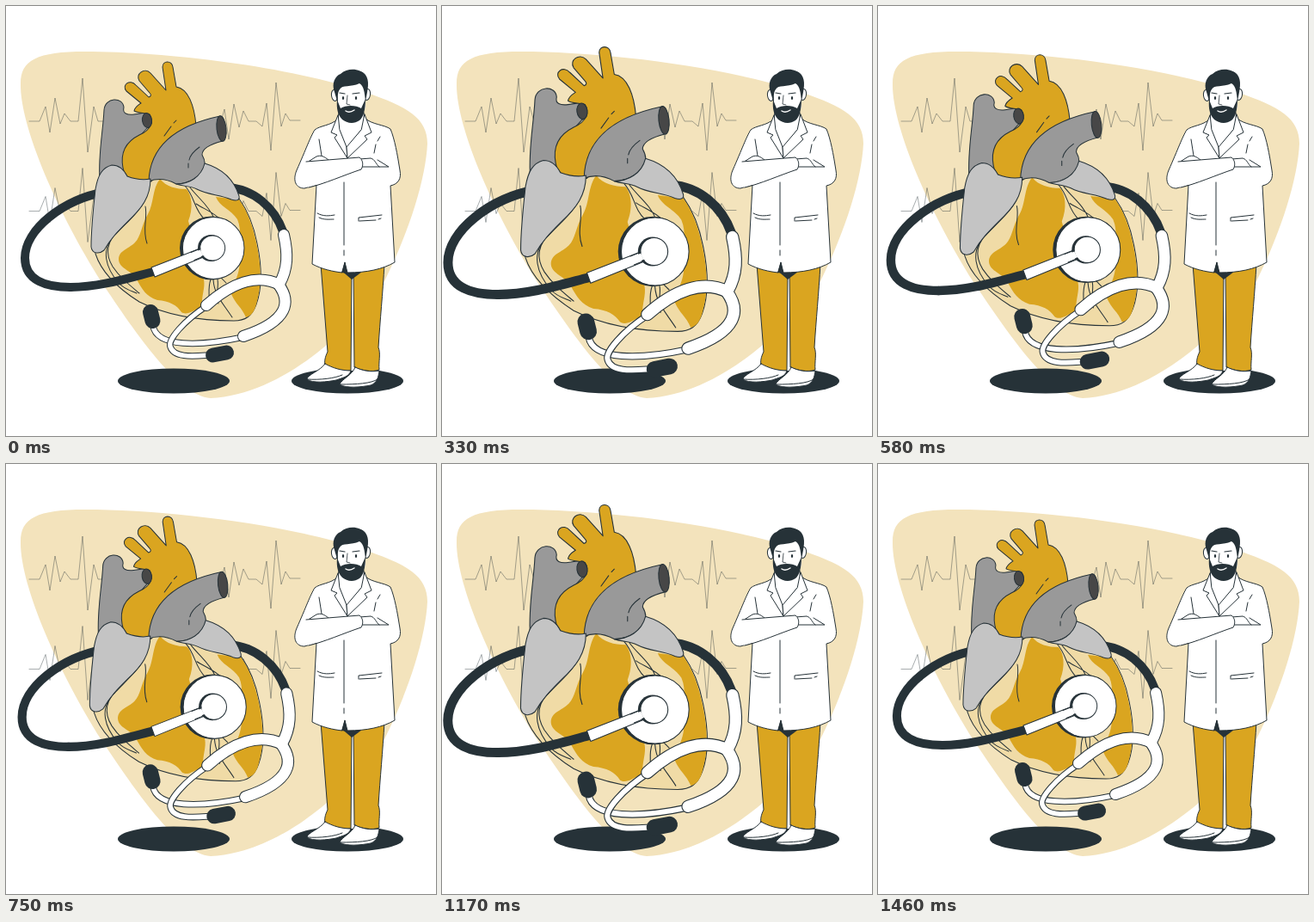
These frames come from a looping animation (500 px wide and 500 px high, 1500 ms). An HTML page:

```html
<!DOCTYPE html>
<html lang="en">
<head>
<meta charset="utf-8">
<title>Heart check</title>
<style>
  html, body { margin: 0; width: 100%; height: 100%; overflow: hidden; background: #fff; }
  svg { display: block; width: 100vw; height: 100vh; }
  path, ellipse { stroke-linecap: round; stroke-linejoin: round; }
</style>
</head>
<body>
<svg id="stage" viewBox="0 0 500 500"></svg>
<script>
const INK = '#263238', GOLD = '#daa520', PALE = '#f3e3bc', CREAM = '#f0dba6';
const GREY = '#999', LIGHT = '#c4c4c4', DARK = '#474747', WHITE = '#fff';
const stage = document.getElementById('stage');

function add(parent, tag, attrs) {
  const node = document.createElementNS('http://www.w3.org/2000/svg', tag);
  for (const key in attrs) node.setAttribute(key, attrs[key]);
  return parent.appendChild(node);
}
const fill = (g, d, color) => add(g, 'path', { d, fill: color });
const line = (g, d, width = 1, color = INK) =>
  add(g, 'path', { d, fill: 'none', stroke: color, 'stroke-width': width });
const shape = (g, d, color = WHITE) =>
  add(g, 'path', { d, fill: color, stroke: INK, 'stroke-width': 1 });
const oval = (g, cx, cy, rx, ry, color, turn = 0, stroke = 'none') =>
  add(g, 'ellipse', { cx, cy, rx, ry, fill: color, stroke, transform: `rotate(${turn} ${cx} ${cy})` });

// Several tubes share one outline so that their joints stay open.
function tubes(g, width, ...paths) {
  paths.forEach(d => line(g, d, width + 2));
  paths.forEach(d => line(g, d, width, WHITE));
}

function drawBackground(g) {
  fill(g, 'M17 90C17 63 36 53 92 53C185 53 330 70 420 101C466 117 490 130 490 160C488 200 470 260 440 320C402 376 322 452 238 456C200 453 152 382 111 321C60 240 16 140 17 90Z', PALE);
  const pulse = 'M27 134H39L46 117L51 147L57 107L63 137L68 125L75 134H84L89 84L95 170L102 117L107 134H120'
    + 'M250 134L254 120L259 155L265 114L271 141L276 122L282 134H291L298 140L303 113L308 168L314 89L320 140L325 125L330 133H342';
  for (const y of [0, 104.5])
    add(g, 'path', { d: pulse, fill: 'none', stroke: INK, 'stroke-width': 0.8, opacity: 0.5, transform: `translate(0 ${y})` });
  oval(g, 195, 436, 65, 14.5, INK);
  oval(g, 397, 436, 65, 14.5, INK);
}

function drawHeart(g) {
  // Tube behind the heart
  line(g, 'M116 216C66 225 22 260 22 293C22 320 48 327 75 327', 10);
  line(g, 'M258 211C288 213 312 234 322 262', 10);

  // Ventricles
  shape(g, 'M150 200C120 230 100 270 104 288C110 307 128 327 155 344C185 359 225 366 265 366C278 366 286 361 291 347C299 325 297 300 292 276C288 255 281 238 271 224C240 200 200 195 150 200Z', CREAM);
  fill(g, 'M179 201C170 212 172 230 165 242C157 256 157 268 150 275C142 283 131 284 131 295C132 306 146 307 152 318C158 329 163 338 176 342C190 343 199 348 204 356C210 360 217 355 228 349C227 337 232 328 230 318L212 250C218 235 216 220 210 213C198 213 186 210 179 201Z', GOLD);
  fill(g, 'M244 222C248 233 262 237 269 248C275 262 270 275 271 290C275 310 262 325 262 335C267 347 274 350 279 362C287 360 290 352 292 343C298 322 296 298 291 275C287 256 281 239 271 225Z', GOLD);
  line(g, 'M167 203C166 228 148 243 134 258C116 274 115 288 124 303C132 315 142 323 155 334M163 222C158 237 140 252 128 265C108 283 117 306 131 322C137 329 145 331 152 334');
  line(g, 'M162 233C165 246 158 260 164 276');
  line(g, 'M208 209C220 222 218 236 231 248M214 211C224 224 236 232 242 247M221 230C230 236 242 240 250 249');
  line(g, 'M238 318C233 332 240 342 232 350M241 318C242 336 252 345 263 362M246 318C248 330 242 338 247 346M249 315L256 322');

  // Vessels
  shape(g, 'M109 202C107 172 113 145 114 121C115 106 136 105 137 118C135 125 141 127 149 126L163 124C171 125 172 141 164 142L155 152L140 200Z', GREY);
  shape(g, 'M169 204C150 204 138 202 136 188C132 167 143 156 155 150C169 144 172 134 167 126C160 124 154 125 149 122C150 117 154 115 157 113L140 99C134 92 144 84 151 92L166 106C169 105 169 103 167 101L155 87C150 79 161 71 168 78L186 98L182 71C182 63 193 63 194 71L198 94C212 96 219 116 221 139Z', GOLD);
  oval(g, 164, 133, 5.5, 8.5, DARK, -8, INK);
  shape(g, 'M166 204C167 170 187 141 249 128L252 157C236 161 228 166 228 173C232 180 233 186 228 192C221 202 209 207 198 207C187 201 176 200 166 204Z', GREY);
  oval(g, 250.5, 142.5, 5.5, 14.8, DARK, -6, INK);
  line(g, 'M184 151L192 140M195 136L198 133M225 164C218 169 214 174 213 179M212 183V188');

  // Atria
  shape(g, 'M123 185C112 188 107 196 104 213C101 240 99 262 99 280C100 288 108 289 114 284C122 270 130 262 142 250C158 235 168 222 168 201C158 203 149 201 141 198C137 190 131 185 123 185Z', LIGHT);
  shape(g, 'M231 183C248 188 264 198 271 221C272 226 268 227 262 225C249 219 235 220 222 213C214 209 207 210 198 207C213 207 227 199 231 183Z', LIGHT);

  // Stethoscope
  line(g, 'M75 327C108 327 140 317 171 309', 10);
  oval(g, 239, 281.5, 37, 37, INK);
  oval(g, 241.2, 281.5, 35.8, 36, WHITE, 0, INK);
  shape(g, 'M169 304L228 281L232 291L173 315Z');
  oval(g, 238.5, 281.5, 15.5, 15.5, INK);
  oval(g, 240.2, 281.5, 14.5, 14.5, WHITE, 0, INK);
  fill(g, 'M216 287L226 283.5L229 290L219 295Z', WHITE);
  line(g, 'M215 286.5L226 282M219 295.5L230 291');

  tubes(g, 5.5, 'M171 372C175 397 225 396 276 385');
  tubes(g, 5.5, 'M233 349C207 366 188 388 191 396C195 410 220 407 236 406');
  tubes(g, 12, 'M323 266C328 288 328 305 318 323',
    'M233 348C262 322 292 311 318 324',
    'M317 324C331 343 330 366 276 384');
  line(g, 'M168 356L170.5 366', 18);
  line(g, 'M240.5 406L256.5 403', 17);
}

function drawDoctor(g) {
  // Legs and shoes
  fill(g, 'M395 306H410L406 424H400Z', WHITE);
  shape(g, 'M366 300L374 402C371 408 370 413 371 418C382 423 391 424 401 424L402 308Z', GOLD);
  shape(g, 'M404 308L405 420C414 424 426 426 434 423C433 414 436 404 433 397C435 365 438 335 440 300Z', GOLD);
  fill(g, 'M388 306L402 318L418 306Z', INK);
  shape(g, 'M371 416C366 424 350 429 350 434C356 439 374 437 384 435C392 432 399 431 401 424C390 424 380 421 371 416Z');
  shape(g, 'M406 420C403 429 390 434 388 440C395 445 414 443 424 441C432 438 433 431 434 424C424 426 414 424 406 420Z');
  line(g, 'M350 434C366 435 382 433 391 429M389 440C407 440 425 439 432 434');

  // Coat
  shape(g, 'M385 132C378 139 365 139 359 144C354 152 349 166 338 191C333 203 337 212 347 212L361 208L356 300C367 306 381 309 391 310L394 298L397 310C420 310 438 306 452 298L447 209C456 207 460 201 458 191C455 172 452 155 447 143C440 138 426 138 418 131Z');
  fill(g, 'M390 310L394 297L397 311Z', INK);
  shape(g, 'M387 124L385 139L396 166L417 139L416 124Z');
  shape(g, 'M386 127L378 147L385 150L382 153L397 177L396 164L388 144Z');
  shape(g, 'M417 126L425 147L417 151L420 155L397 177L396 164L413 144Z');
  line(g, 'M393 205V278M393 284V290');
  line(g, 'M362 241C369 245 376 244 382 243M364 246C370 249 376 248 381 248M410 250V246L437 243M411 250L430 249M433 248L436 247');
  line(g, 'M364 155L367 174M435 152L432 157M430 161L428 171');

  // Folded arms
  shape(g, 'M353 180L361 175C366 173 370 175 375 179L366 184Z');
  line(g, 'M411 178L424 177C429 178 430 184 434 187M432 179L445 187H414');
  fill(g, 'M349 181L411 176C415 179 416 185 413 190L352 211L342 205Z', WHITE);
  line(g, 'M349 181L411 176C415 179 416 185 413 190C392 197 370 207 352 211');

  // Head
  oval(g, 382, 104, 3.5, 6.5, WHITE, -8, INK);
  oval(g, 420, 103, 3.5, 6.5, WHITE, 8, INK);
  fill(g, 'M384 88H418V118C413 130 391 130 386 118Z', WHITE);
  fill(g, 'M382 100C378 90 383 81 389 79C398 71 412 73 418 80C423 87 421 96 418 111C417 100 416 93 411 90C401 95 391 91 388 97C385 101 386 106 386 114Z', INK);
  fill(g, 'M385 109L389 119C395 115 407 115 413 119L418 108C418 122 415 130 411 133C404 138 396 136 391 132C386 127 384 120 385 109Z', INK);
  line(g, 'M395 122C398 124 402 123 405 121', 1.4, WHITE);
  line(g, 'M388 101L394 102M403 102L411 101', 1.2);
  line(g, 'M397 104L396 114L400 115', 0.8);
  oval(g, 392, 107, 1.2, 2, INK);
  oval(g, 407, 107, 1.2, 2, INK);
}

const group = draw => { const g = add(stage, 'g', {}); draw(g); return g; };
group(drawBackground);
const heart = group(drawHeart);
group(drawDoctor);

// Double beat: [time in ms, scale]
const LOOP = 1500;
const beat = [[0, 1], [295, 1.1], [755, 1.022], [880, 1.023], [1180, 1.1], [1475, 1], [LOOP, 1]];

function scaleAt(time) {
  const i = beat.findIndex(([end]) => time < end);
  const [t0, s0] = beat[i - 1], [t1, s1] = beat[i];
  const ease = (1 - Math.cos(Math.PI * (time - t0) / (t1 - t0))) / 2;
  return s0 + (s1 - s0) * ease;
}

// Setting the attribute redraws the vectors sharply at every size.
function tick() {
  const scale = scaleAt(performance.now() % LOOP);
  heart.setAttribute('transform', `translate(174.5 241) scale(${scale}) translate(-174.5 -241)`);
  requestAnimationFrame(tick);
}
tick();
</script>
</body>
</html>
```
